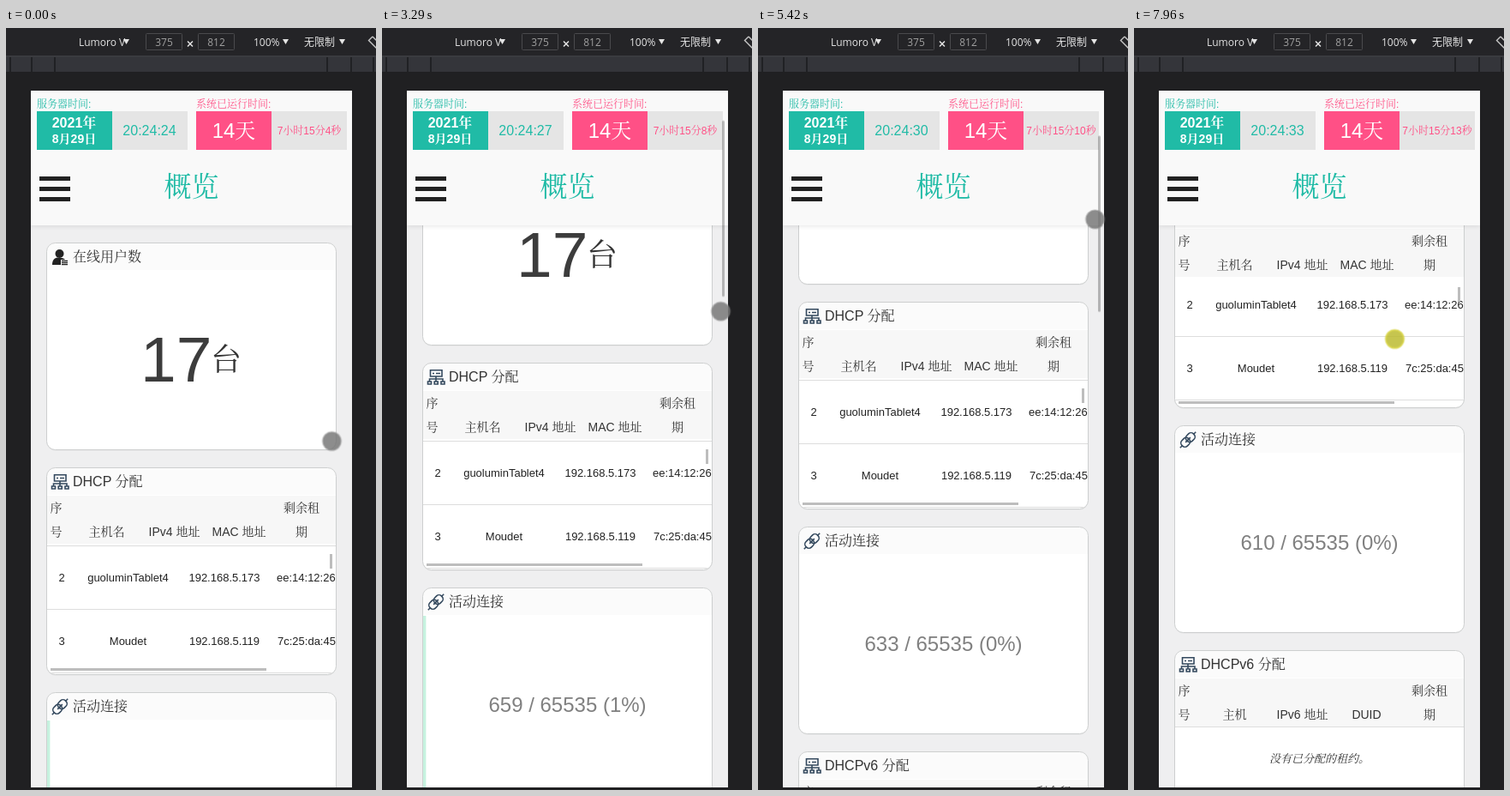
An HTML page that plays this animation: 432x888 px, repeating every 8 s.

```html
<!DOCTYPE html>
<html lang="zh-CN">
<head>
<meta charset="utf-8">
<title>概览</title>
<style>
@property --scroll { syntax: "<number>"; inherits: true; initial-value: 0; }
html, body { margin: 0; width: 100%; height: 100%; overflow: hidden; background: #202022; }
svg { display: block; }
.stage {
  font: 300 14px "Liberation Sans", "Noto Serif CJK SC", "Noto Sans CJK SC", "Noto Sans CJK", sans-serif;
  fill: #333;
}
.mid { text-anchor: middle; }
.tools { font: 12px "Open Sans", "Noto Sans CJK SC", "Noto Sans CJK", sans-serif; fill: #e4e4e4; }
.title { font-size: 16px; }
.rows { font-size: 13px; fill: #222; }
.rule { stroke: #ddd; }
.teal { fill: #20bba6; }
.pink { fill: #ff5086; }
.white { fill: #fff; }
.small { font-size: 12px; }
.label { font-size: 12px; font-weight: 500; }
.thumb { fill: #bdbdbd; }
.line { fill: none; stroke: #34495e; stroke-width: 1.6; }

.phone { animation: scroll 8s linear infinite; }
.page { transform: translateY(calc(var(--scroll) * -1px)); }
.bar { transform: translateY(calc(var(--scroll) * .25px)); animation: bar 8s step-end infinite; }
.rows-move { animation: rows 8s linear infinite; }
.touch { animation: touch 8s linear infinite; }
.dot { animation: press 8s step-end infinite; stroke-width: 2; }

@keyframes scroll {
  0%, 30.6% { --scroll: 0; }
  35.2% { --scroll: 83; animation-timing-function: ease-out; }
  38.5%, 49.5% { --scroll: 122; }
  56.8% { --scroll: 133; }
  57.5% { --scroll: 134; }
  61.1% { --scroll: 161; }
  67% { --scroll: 189; }
  67.75%, 78.5% { --scroll: 193; }
  84.25% { --scroll: 241; }
  86.75% { --scroll: 262; animation-timing-function: ease-out; }
  92%, 100% { --scroll: 311; }
}
@keyframes bar {
  0% { opacity: 0; }
  30.6% { opacity: 1; }
  98.8%, 100% { opacity: 0; }
}
@keyframes rows {
  0%, 98% { transform: translateY(0); }
  99.5%, 100% { transform: translateY(-7px); }
}
@keyframes touch {
  0%, .87% { transform: translate(380.5px, 481.5px); }
  10.4% { transform: translate(411px, 587px); }
  12%, 16% { transform: translate(411px, 598px); }
  17.75%, 21.8% { transform: translate(410px, 600px); }
  26.75%, 30.2% { transform: translate(398.5px, 576.5px); }
  36%, 39.2% { transform: translate(401px, 493px); }
  41.1% { transform: translate(395.5px, 330.5px); }
  44.5%, 46.7% { transform: translate(395px, 303px); }
  49.5% { transform: translate(395px, 290px); }
  56.8% { transform: translate(395px, 279px); }
  61.1% { transform: translate(395.5px, 251px); }
  67.75% { transform: translate(393.5px, 222.5px); }
  75.4%, 77.6% { transform: translate(406px, 511px); }
  78.5% { transform: translate(406px, 496px); }
  84.25% { transform: translate(401.5px, 448.5px); }
  86.75% { transform: translate(399px, 427px); animation-timing-function: ease-out; }
  91.6% { transform: translate(398px, 378px); }
  95.9%, 97.7% { transform: translate(304.5px, 375px); }
  99.5%, 100% { transform: translate(304.5px, 362.5px); }
}
@keyframes press {
  0%, 36%, 67.6%, 91.8% { fill: rgba(112, 112, 112, .8); stroke: rgba(140, 140, 140, .55); }
  30%, 46.7%, 77.8%, 97.7%, 100% { fill: rgba(186, 184, 40, .82); stroke: rgba(216, 212, 70, .8); }
}
</style>
</head>
<body>
<svg class="stage" width="432" height="888" viewBox="0 0 432 888">
  <defs>
    <clipPath id="screen"><rect x="29" y="73" width="375" height="812"/></clipPath>
    <clipPath id="list"><path d="M1 90H338V231a10 10 0 0 1-10 10H11a10 10 0 0 1-10-10Z"/></clipPath>
    <clipPath id="inside"><rect x="1" y="1" width="337" height="240" rx="10"/></clipPath>
    <g id="card">
      <rect x=".5" y="1.5" width="338" height="241" rx="10" fill="#000" opacity=".06"/>
      <rect x=".5" y=".5" width="338" height="241" rx="10" fill="#fff"/>
      <path d="M1 32V11A10 10 0 0 1 11 1H328a10 10 0 0 1 10 10V32Z" fill="#fbfbfb"/>
      <rect x=".5" y=".5" width="338" height="241" rx="10" fill="none" stroke="#cdcfcf"/>
    </g>
    <g id="head" class="mid">
      <rect x="1" y="33" width="337" height="56" fill="#f7f7f7"/>
      <text x="11.5" y="52">序</text><text x="11.5" y="80">号</text>
      <text x="298" y="52">剩余租</text><text x="298" y="80">期</text>
    </g>
    <g id="net" class="line">
      <path d="M9.5 8.8H23V16H9.5ZM16 16V20M8.5 22V19H24V22M16 19V22M12 12.5H14M16 12.5H21"/>
      <path d="M6.5 22H10.5V25H6.5ZM14.2 22H18.2V25H14.2ZM22 22H26V25H22Z"/>
    </g>
    <g id="tri"><path d="M0 0H7L3.5 6Z" fill="#e4e4e4"/></g>
  </defs>

  <rect width="432" height="888" fill="#202022"/>
  <rect width="432" height="32" fill="#242427"/>
  <rect y="32" width="432" height="2" fill="#3a3b3f"/>
  <rect y="34" width="432" height="17" fill="#34353a"/>
  <path d="M5 34V51M30 34V51M57 34V51M375 34V51M403 34V51M429 34V51" stroke="#202124" stroke-width="2"/>
  <g class="tools">
    <text x="85" y="21">Lumoro V</text>
    <text x="289" y="21">100%</text>
    <text x="348" y="21" font-weight="500">无限制</text>
    <use href="#tri" x="137" y="13"/><use href="#tri" x="323" y="13"/><use href="#tri" x="389" y="13"/>
    <g fill="none" stroke="#4a4a4d"><rect x="163.5" y="6.5" width="42" height="19" rx="1"/><rect x="224.5" y="6.5" width="42" height="19" rx="1"/></g>
    <g class="mid" fill="#a0a0a0"><text x="184.5" y="21">375</text><text x="245.5" y="21">812</text></g>
    <path d="M212 15.5L218 21.5M218 15.5L212 21.5" stroke="#e4e4e4" stroke-width="1.5"/>
    <path d="M428 10L423.500 14.500L433 24M428 10L437 19" fill="none" stroke="#c8c8c8" stroke-width="1.4"/>
  </g>

  <g class="phone" clip-path="url(#screen)">
    <rect x="29" y="73" width="375" height="812" fill="#efeff0"/>
    <g class="page">
      <g transform="translate(47 250)">
        <use href="#card"/>
        <g fill="#222">
          <circle cx="15.500" cy="13" r="5"/>
          <path d="M7 26C7 20 10 18 13 17.500L18 18C20 18 21 19 22 20H17V26Z"/>
          <path d="M18 21.500H25M18 23.700H25M18 25.700H25" stroke="#222" stroke-width="1.3"/>
        </g>
        <text class="title" x="31" y="22">在线用户数</text>
        <text x="110" y="162" font-size="75" fill="#3c3c3c">17</text>
        <text x="192" y="149" font-size="36">台</text>
      </g>

      <g transform="translate(47 512)">
        <use href="#card"/><use href="#net"/>
        <text class="title" x="31" y="22">DHCP 分配</text>
        <g clip-path="url(#list)">
          <g class="rows rows-move">
            <path class="rule" d="M1 91.500H338M1 165.500H338M1 239.500H338"/>
            <g class="mid">
              <text x="18" y="133">2</text><text x="95.500" y="133">guoluminTablet4</text><text x="208" y="133">192.168.5.173</text>
              <text x="18" y="207">3</text><text x="95.500" y="207">Moudet</text><text x="208" y="207">192.168.5.119</text>
            </g>
            <text x="269" y="133">ee:14:12:26</text><text x="270" y="207">7c:25:da:45</text>
          </g>
        </g>
        <use href="#head"/>
        <g class="mid"><text x="70.500" y="80">主机名</text><text x="149.500" y="80">IPv4 地址</text><text x="225" y="80">MAC 地址</text></g>
        <rect class="thumb" x="5" y="234" width="252" height="3"/>
        <rect class="thumb" x="331" y="101" width="3" height="17"/>
      </g>

      <g transform="translate(47 774)">
        <use href="#card"/>
        <g class="line" transform="rotate(-45 16 17)">
          <rect x="6.500" y="12.500" width="11" height="9" rx="4"/><rect x="14.500" y="12.500" width="11" height="9" rx="4"/>
          <path d="M3 17H6.500M25.500 17H29M12 17H20"/>
        </g>
        <text class="title" x="31" y="22">活动连接</text>
        <rect id="load" x="1" y="33" height="208" fill="#c6f2df" clip-path="url(#inside)"/>
        <text id="links" class="mid" x="169.500" y="145" font-size="24" fill="#808080"></text>
      </g>

      <g transform="translate(47 1036)">
        <use href="#card"/><use href="#net"/>
        <text class="title" x="31" y="22">DHCPv6 分配</text>
        <use href="#head"/>
        <path class="rule" d="M1 89.500H338"/>
        <g class="mid">
          <text x="70.500" y="80">主机</text><text x="149.500" y="80">IPv6 地址</text><text x="224.500" y="80">DUID</text>
          <text x="169.500" y="131" font-size="13" font-style="italic">没有已分配的租约。</text>
        </g>
      </g>
    </g>

    <rect x="29" y="73" width="375" height="157" fill="#f9f9f9" style="filter:drop-shadow(0 0 3px rgba(0,0,0,.12))"/>
    <text class="label teal" x="36" y="93">服务器时间:</text>
    <text class="label pink" x="222" y="93">系统已运行时间:</text>
    <rect x="124" y="97" width="88" height="45" fill="#e5e5e5"/>
    <rect x="310" y="97" width="88" height="45" fill="#e5e5e5"/>
    <rect class="teal" x="36" y="97" width="88" height="45"/>
    <rect class="pink" x="222" y="97" width="88" height="45"/>
    <g class="mid">
      <g class="white" font-weight="700"><text x="79.500" y="116" font-size="16">2021年</text><text x="79.500" y="134" font-size="14">8月29日</text></g>
      <text class="white" x="266" y="128" font-size="24" font-weight="500">14天</text>
      <text id="clock" class="teal" x="167.500" y="125" font-size="16"></text>
      <text id="uptime" class="pink small" x="354" y="124"></text>
      <text class="teal" x="216.500" y="196" font-size="32" font-weight="400">概览</text>
    </g>
    <path d="M39 175.500H75M39 187.500H75M39 199.500H75" stroke="#222" stroke-width="5"/>
    <rect class="bar" x="397" y="77.500" width="3" height="205" rx="1" fill="rgba(0,0,0,.25)"/>
  </g>

  <g class="touch"><circle class="dot" r="10.500"/></g>
</svg>
<script>
const LOOP = 8000, LIMIT = 65535;
// start ms, clock seconds, uptime seconds, connections
const polls = [
  [0, 24, 4, 659], [450, 25, 6, 659], [2290, 27, 8, 659], [3790, 28, 9, 641],
  [4700, 30, 10, 633], [6300, 31, 12, 617], [7500, 33, 13, 610]
];
const byId = id => document.getElementById(id);
let start, shown;

function show(poll) {
  const [, sec, up, links] = poll;
  const percent = Math.floor(links / LIMIT * 100);
  byId("clock").textContent = `20:24:${sec}`;
  byId("uptime").textContent = `7小时15分${up}秒`;
  byId("links").textContent = `${links} / ${LIMIT} (${percent}%)`;
  byId("load").setAttribute("width", percent * 3.38);
  shown = poll;
}

function tick(now) {
  start ??= now;
  const t = (now - start) % LOOP;
  const poll = polls.findLast(p => p[0] <= t) || polls[0];
  if (poll !== shown) show(poll);
  requestAnimationFrame(tick);
}
show(polls[0]);
requestAnimationFrame(tick);
</script>
</body>
</html>
```
